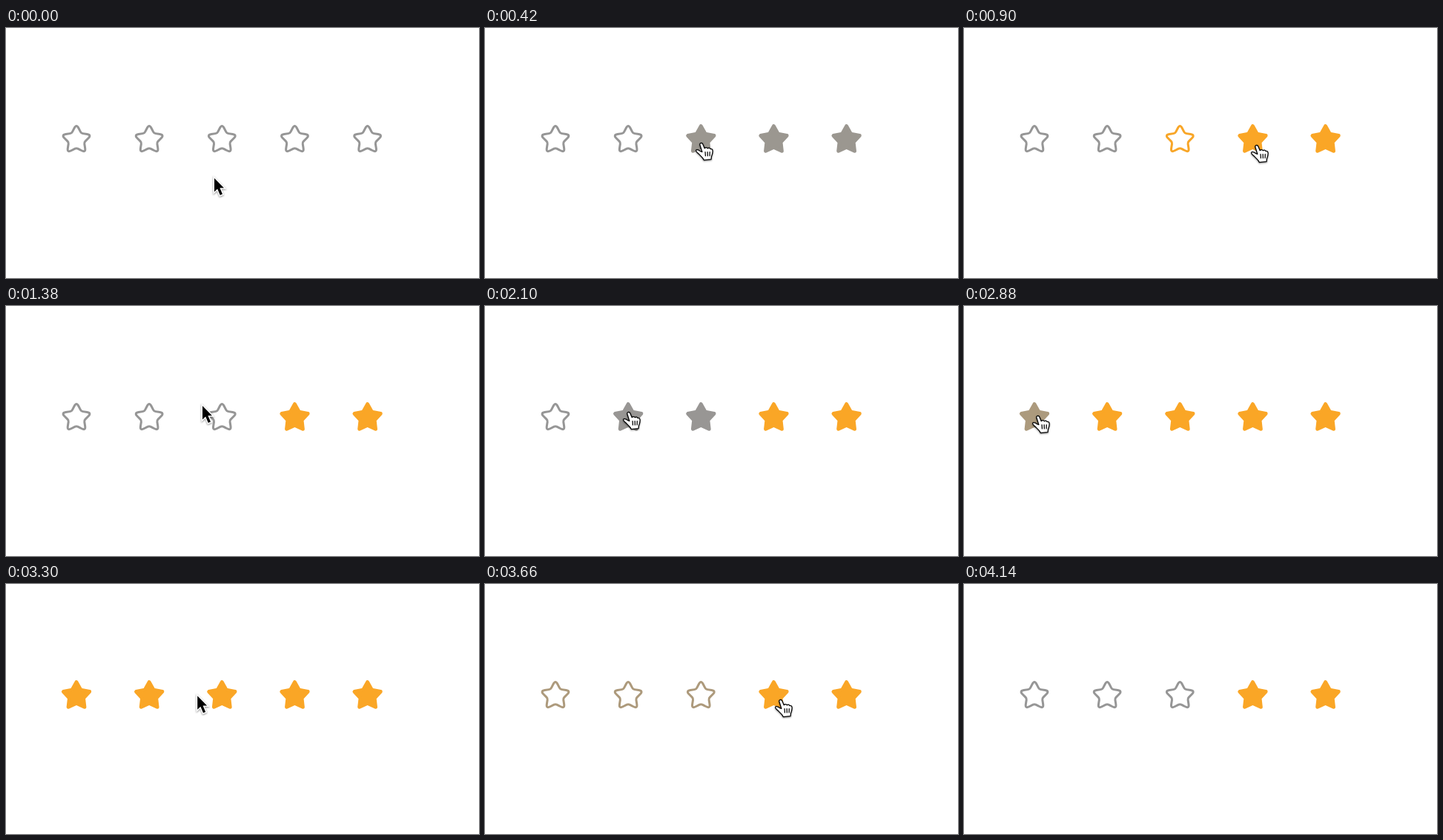
These frames come from a looping animation (638x338 px, 4260 ms). An HTML page:

```html
<!DOCTYPE html>
<html lang="en">
<head>
<meta charset="utf-8">
<title>Star rating</title>
<style>
  html, body { margin: 0; width: 100%; height: 100%; overflow: hidden; background: #fff; }
  svg { display: block; }
  .line { fill: none; stroke: currentColor; stroke-width: 3; stroke-linecap: round; }
  .solid { fill: currentColor; stroke: currentColor; stroke-width: 5; stroke-linejoin: round; }
  .cursor { filter: drop-shadow(0 1px 1px rgba(0, 0, 0, .45)); }
  #arrow path { fill: #000; stroke: #fff; stroke-width: 3; paint-order: stroke; }
  #hand path { fill: #fff; stroke: #000; stroke-width: 1.3; stroke-linejoin: round; stroke-linecap: round; }
</style>
</head>
<body>
<svg width="638" height="338" viewBox="0 0 638 338">
  <defs>
    <path id="line" class="line"/>
    <path id="solid" class="solid"/>
  </defs>
  <g id="stars"></g>
  <g id="arrow" class="cursor"><path d="M0 0V18.5L4.2 14.4L7.8 23L11 21.6L7.4 13.2H13Z"/></g>
  <g id="hand" class="cursor">
    <g transform="translate(.4 1.4) scale(.97)">
      <path d="M-1.5 3C-2.5 0 1.3 -1 2.6 1.8L5 7.5C6 5.8 8.6 6 9.2 7.6C10.4 6.4 12.4 6.8 13 8.5C14.4 7.8 16 8.8 16.2 11C16.5 14 15.5 16.5 14.5 19L14 23L4 24C3 20.5 -1 18 -3 15.5C-5 13.5 -7 12.5 -7 10.8C-7 9 -4 8.6 -1 11.5L1.5 12.5Z"/>
      <path d="M5.8 12.5L6.2 18M9 12.5L9.2 18M12.2 12.5L12.1 18"/>
    </g>
  </g>
</svg>
<script>
const LOOP = 4260, STEP = 60, FADE = 300, COUNT = 5;
const GREY = [150, 150, 150], ORANGE = [250, 166, 38];
const HOME = { x: 281, y: 203 };

// Pointer moves; on arrival, stars from index `first` rightwards are filled.
const MOVES = [
  { from: 60, to: 400, x: 291, y: 154, first: 2 },
  { from: 600, to: 890, x: 394, y: 157, first: 3 },
  { from: 1080, to: 1380, x: 265, y: 135 },
  { from: 1800, to: 2090, x: 193, y: 142, first: 1 },
  { from: 2460, to: 2830, x: 99, y: 147, first: 0 },
  { from: 3060, to: 3520, x: 398, y: 155, first: 3 },
  { from: 3660, to: 3900, x: 198, y: 263 },
  { from: 3900, to: 4140, x: 110, y: 370 }
];

const $ = id => document.getElementById(id);
const mix = (a, b, u) => a + (b - a) * u;
const between = (p, q, u) => [mix(p[0], q[0], u), mix(p[1], q[1], u)];
const starX = i => 95 + 98.15 * i;

function make(tag, attrs, parent) {
  const el = document.createElementNS("http://www.w3.org/2000/svg", tag);
  for (const k in attrs) el.setAttribute(k, attrs[k]);
  return parent.appendChild(el);
}

function corners(outer, inner) {
  return Array.from({ length: 10 }, (_, k) => {
    const r = k % 2 ? inner : outer, a = k * Math.PI / 5;
    return [r * Math.sin(a), 1.2 - r * Math.cos(a)];
  });
}

// Rounded outline, left open on the edge beside the lower right tip.
function outline() {
  const pts = corners(21.5, 11);
  let d = "M" + between(pts[5], pts[4], 0.42);
  for (let k = 5; k < 15; k++) {
    const at = n => pts[n % 10], round = k % 2 ? 0.15 : 0.44;
    d += `L${between(at(k), at(k - 1), round)}Q${at(k)} ${between(at(k), at(k + 1), round)}`;
  }
  return d;
}

$("line").setAttribute("d", outline());
$("solid").setAttribute("d", "M" + corners(18.5, 10).join("L") + "Z");

const stars = Array.from({ length: COUNT }, (_, i) => {
  const g = make("g", { transform: `translate(${starX(i)} 150)` }, $("stars"));
  return { g, icon: make("use", { href: "#line" }, g) };
});

const clamp = u => Math.min(1, Math.max(0, u));
const smooth = u => u * u * (3 - 2 * u);

// cubic-bezier(.25, .1, .25, 1)
function ease(x) {
  const curve = (s, a, b) => 3 * a * s * (1 - s) ** 2 + 3 * b * s * s * (1 - s) + s ** 3;
  let lo = 0, hi = 1;
  for (let n = 0; n < 20; n++) {
    const mid = (lo + hi) / 2;
    if (curve(mid, .25, .25) < x) lo = mid; else hi = mid;
  }
  return curve(lo, .1, 1);
}

function starState(i, t) {
  let on = false, since = -FADE;
  for (const { to, first } of MOVES) {
    if (first !== undefined && to <= t && (i >= first) !== on) {
      on = !on;
      since = to;
    }
  }
  const p = ease(clamp((t - since) / FADE));
  return { on, tint: on ? p : 1 - p };
}

function pointer(t) {
  let { x, y } = HOME;
  for (const m of MOVES) {
    const u = smooth(clamp((t - m.from) / (m.to - m.from)));
    x = mix(x, m.x, u);
    y = mix(y, m.y, u);
  }
  return [x, y];
}

function draw(t) {
  stars.forEach(({ g, icon }, i) => {
    const { on, tint } = starState(i, t);
    icon.setAttribute("href", on ? "#solid" : "#line");
    g.style.color = `rgb(${GREY.map((c, k) => Math.round(mix(c, ORANGE[k], tint)))})`;
  });
  const [x, y] = pointer(t);
  const over = Math.abs(y - 150) < 22 && stars.some((_, i) => Math.abs(x - starX(i)) < 20);
  for (const [id, shown] of [["hand", over], ["arrow", !over]]) {
    $(id).setAttribute("transform", `translate(${x.toFixed(1)} ${y.toFixed(1)})`);
    $(id).style.display = shown ? "" : "none";
  }
}

const start = performance.now();
function tick() {
  const t = (performance.now() - start) % LOOP;
  draw(Math.floor(t / STEP) * STEP);
  requestAnimationFrame(tick);
}
draw(0);
requestAnimationFrame(tick);
</script>
</body>
</html>
```
